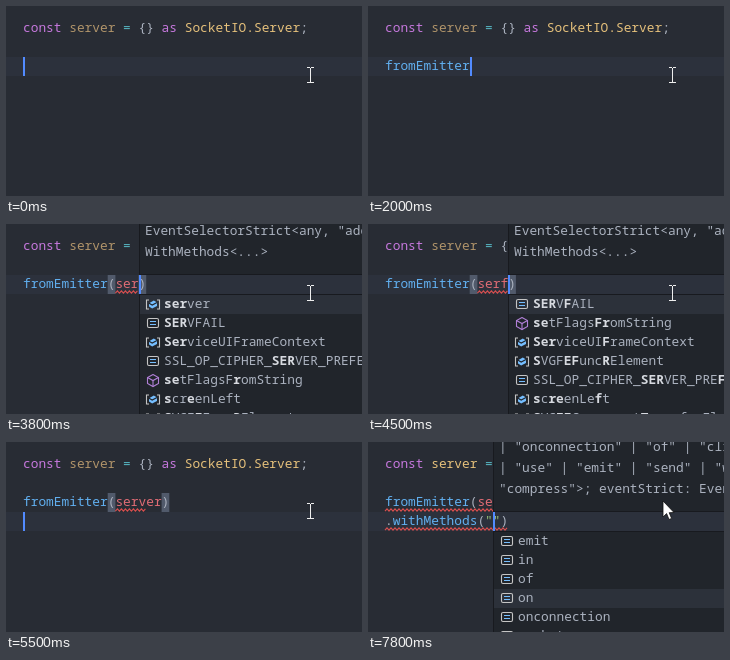
An HTML page with a canvas for the animation above (8000 ms loop, 356 by 190 pixels).

```html
<!DOCTYPE html>
<html lang="en">
<head>
<meta charset="utf-8">
<title>Typing in an editor</title>
<style>
html, body { margin: 0; width: 100%; height: 100%; overflow: hidden; background: #282c34; }
canvas { display: block; width: 356px; height: 190px; }
</style>
</head>
<body>
<canvas id="stage" width="356" height="190"></canvas>
<script>
const ctx = document.getElementById('stage').getContext('2d');
const LOOP = 8000, LEFT = 17, CHAR = 7.7, ROW = 19, TOP = 13, HINT_ROW = 21;
const FONT = '12.83px "Noto Sans Mono", "DejaVu Sans Mono", monospace';
const C = {
  bg: '#282c34', line: '#2c313c', panel: '#21252b', border: '#181a1f', text: '#abb2bf',
  bright: '#d7dae0', dim: '#7f848e', purple: '#c678dd', tan: '#b0946a', cyan: '#56b6c2',
  yellow: '#e5c07b', red: '#e06c75', blue: '#61afef', green: '#98c379',
  caret: '#528bff', error: '#d84f4f', bracket: '#515a6b', icon: '#75beff'
};
const colX = col => LEFT + col * CHAR;
const rowY = row => TOP + row * ROW;

function rect(x, y, w, h, color) {
  ctx.fillStyle = color;
  ctx.fillRect(x, y, w, h);
}

function text(str, x, base, color, bold) {
  ctx.font = (bold ? 'bold ' : '500 ') + FONT;
  ctx.fillStyle = color;
  ctx.fillText(str, x, base);
  return x + str.length * CHAR;
}

function spans(parts, x, base) {
  for (const [str, color] of parts) x = text(str, x, base, color);
}

// Text between square brackets is drawn bold.
function marked(str, x, base) {
  str.split(/[\[\]]/).forEach((part, i) => {
    x = text(part, x, base, i % 2 ? C.bright : C.text, i % 2);
  });
}

function path(points, color, fill) {
  ctx.beginPath();
  points.forEach(([x, y]) => ctx.lineTo(x, y));
  if (fill) {
    ctx.fillStyle = color;
    ctx.fill();
  } else {
    ctx.strokeStyle = color;
    ctx.stroke();
  }
}

function squiggle(from, to, row) {
  const y = rowY(row) + 17, pts = [];
  for (let x = colX(from), i = 0; x <= colX(to); x += 2, i++) pts.push([x, y + (i % 2 ? -1.2 : 1.2)]);
  ctx.lineWidth = 1.1;
  path(pts, C.error);
}

function solidCube(x, y, s) {
  path([[x - s, y - s * .3], [x + s * .2, y - s], [x + s, y - s * .5], [x + s, y + s * .4], [x - s * .2, y + s], [x - s, y + s * .5]], C.icon, true);
  path([[x - s, y - s * .3], [x - s * .2, y + s * .15], [x + s, y - s * .5]], C.panel);
}

const icons = {
  method(x, y) {
    path([[x, y - 6], [x + 5.5, y - 3], [x + 5.5, y + 3], [x, y + 6], [x - 5.5, y + 3], [x - 5.5, y - 3], [x, y - 6]], '#b180d7');
    path([[x - 5.5, y - 3], [x, y], [x + 5.5, y - 3]], '#b180d7');
    path([[x, y], [x, y + 6]], '#b180d7');
  },
  variable(x, y) {
    for (const d of [-1, 1]) {
      path([[x + d * 4, y - 4.5], [x + d * 6.5, y - 4.5], [x + d * 6.5, y + 4.5], [x + d * 4, y + 4.5]], '#c5c5c5');
    }
    solidCube(x, y, 4);
  },
  constant(x, y) {
    ctx.strokeStyle = '#c5c5c5';
    ctx.beginPath();
    ctx.roundRect(x - 5.5, y - 5, 11, 9, 1.5);
    ctx.stroke();
    rect(x - 3, y - 2.5, 6, 1, C.icon);
    rect(x - 3, y + .5, 6, 1, C.icon);
  },
  field(x, y) { solidCube(x, y, 6); }
};

const M = 'method', V = 'variable', K = 'constant';
const imports = [[M, 'from'], [V, 'fromEmitter'], [M, 'fromEvent'], [K, 'fromEvent'],
  [K, 'fromEvent'], [M, 'fromEventPattern'], [M, 'fromEventStrict']];
const serList = [[V, '[ser]ver'], [K, '[SER]VFAIL'], [V, '[Ser]viceUIFrameContext'],
  [K, 'SSL_OP_CIPHER_[SER]VER_PREFERENCE'], [M, '[se]tFlagsF[r]omString'],
  [V, '[s]cr[e]enLeft'], [V, '[S]VGF[E]Func[R]Element']];
const serfList = [[K, '[SER]V[F]AIL'], [M, '[se]tFlags[Fr]omString'], [V, '[Ser]viceUI[F]rameContext'],
  [V, '[S]VGF[EF]unc[R]Element'], [K, 'SSL_OP_CIPHER_[SER]VER_PRE[F]ERENCE'],
  [V, '[s]c[re]enLe[f]t'], [V, '[S]VG[FE]Component[T]ransferElement']];
const events = ['emit', 'in', 'of', 'on', 'onconnection', 'sockets'].map(name => [K, name]);

function importList(typed) {
  return imports.filter(([, name]) => name.startsWith(typed))
    .map(([icon, name]) => [icon, '[' + typed + ']' + name.slice(typed.length)]);
}

const hints = {
  emitter: ['fromEmitter(emitter: unknown):'],
  selector: ['EventSelectorStrict<any, "addListener"', 'WithMethods<...>'],
  methods: ['| "onconnection" | "of" | "clients"', '| "use" | "emit" | "send" | "write"', '"compress">; eventStrict: EventSelector']
};

// name: identifier before a call; arg: call argument; tail: second line of the chain
const steps = [
  { t: 0, name: '' },
  { t: 300, name: 'f' },
  { t: 800, name: 'fr', list: importList('fr'), note: 'Auto import' },
  { t: 1000, name: 'fro', list: importList('fro'), note: 'Auto import' },
  { t: 1300, name: 'from', list: importList('from'), note: 'Auto import' },
  { t: 1500, name: 'fromE', list: importList('fromE'), note: 'Auto import' },
  { t: 1800, name: 'fromEm', list: importList('fromEm'), note: 'Auto import' },
  { t: 2000, name: 'fromEmitter' },
  { t: 2300, arg: '' },
  { t: 2500, arg: '', hint: 'emitter' },
  { t: 2800, arg: '', hint: 'emitter', wavy: [0, 13] },
  { t: 3000, arg: 's', hint: 'emitter', wavy: [0, 14] },
  { t: 3300, arg: 'se', hint: 'selector', wavy: [0, 15], list: serList },
  { t: 3500, arg: 'ser', hint: 'selector', wavy: [0, 16], list: serList },
  { t: 3800, arg: 'ser', hint: 'selector', wavy: [12, 15], list: serList },
  { t: 4300, arg: 'serf', hint: 'selector', wavy: [12, 15], list: serfList },
  { t: 4500, arg: 'serf', hint: 'selector', wavy: [12, 16], list: serfList },
  { t: 4800, arg: 'ser', hint: 'selector', wavy: [12, 15], list: serList },
  { t: 5000, arg: 'serv', hint: 'selector', wavy: [12, 16], list: serList.slice(0, 4) },
  { t: 5300, arg: 'server', wavy: [12, 16] },
  { t: 5500, arg: 'server', wavy: [12, 16], tail: '' },
  { t: 5800, arg: 'server', tail: '.' },
  { t: 6000, arg: 'server', tail: '.', list: [['field', 'withMethods']] },
  { t: 6300, arg: 'server', tail: '.', list: [['field', 'withMethods']], detail: true },
  { t: 6500, arg: 'server', tail: '.', list: [['field', 'withMethods']], detail: true, wavyTail: 1, off: true },
  { t: 6800, arg: 'server', tail: '.w', list: [['field', '[w]ithMethods']], detail: true, wavyTail: 1 },
  { t: 7000, arg: 'server', tail: '.withMethods', wavyTail: 1 },
  { t: 7300, arg: 'server', tail: '.withMethods()', col: 13, hint: 'methods', wavy: [0, 19], wavyTail: 14 },
  { t: 7500, arg: 'server', tail: '.withMethods("")', col: 14, hint: 'methods', wavy: [0, 19], wavyTail: 16, list: events, pick: 3, off: true },
  { t: 7800, arg: 'server', tail: '.withMethods("")', col: 14, hint: 'methods', wavy: [0, 19], wavyTail: 16, list: events, pick: 3 }
];

function drawCode(s, row) {
  rect(0, rowY(row), 356, ROW, C.line);
  // The variable is dimmed until the editor sees that it is used.
  spans([['const ', C.purple], ['server ', s.t < 6800 ? C.tan : C.yellow], ['= ', C.cyan], ['{} ', C.text],
    ['as ', C.purple], ['SocketIO.Server', C.yellow], [';', C.text]], LEFT, rowY(0) + 13);
  const base = rowY(2) + 13;
  if (s.arg === undefined) {
    text(s.name, LEFT, base, s.name === 'fromEmitter' ? C.blue : C.red);
  } else {
    if (s.t < 5800) {
      for (const col of [11, 12 + s.arg.length]) rect(colX(col), rowY(2), CHAR, ROW, C.bracket);
    }
    spans([['fromEmitter', C.blue], ['(', C.text], [s.arg, C.red], [')', C.text]], LEFT, base);
  }
  if (s.tail) {
    const [, word, open, str, close] = s.tail.match(/^\.(\w*)(\(?)("*)(\)?)$/);
    spans([['.', C.text], [word, C.blue], [open, C.text], [str, C.green], [close, C.text]], LEFT, rowY(3) + 13);
  }
  if (s.wavy) squiggle(...s.wavy, 2);
  if (s.wavyTail) squiggle(0, s.wavyTail, 3);
}

function drawHint(s, x, bottom) {
  const lines = hints[s.hint], top = bottom - 18 - lines.length * HINT_ROW;
  rect(x, top, 400, bottom - top, C.border);
  rect(x + 1, top + 1, 400, bottom - top - 2, C.panel);
  lines.forEach((line, i) => {
    const base = bottom - 19 - (lines.length - 1 - i) * HINT_ROW;
    if (s.hint !== 'emitter') return text(line, x + 6, base, C.text);
    const start = text('fromEmitter(', x + 6, base, C.text);
    const end = text('emitter: unknown', start, base, C.text, true);
    rect(start, base + 2, end - start, 1, C.text);
    text('):', end, base, C.text);
  });
}

function drawList(s, x, top) {
  const h = s.list.length * ROW;
  rect(x, top, 331, h + 2, C.border);
  rect(x + 1, top + 1, 329, h, C.panel);
  s.list.forEach(([icon, label], i) => {
    const y = top + 1 + i * ROW;
    if (i === (s.pick || 0)) rect(x + 1, y, 329, ROW, '#2c313a');
    ctx.lineWidth = 1.1;
    icons[icon](x + 14, y + 9.5);
    marked(label, x + 25, y + 13);
  });
  if (s.note) text(s.note, 271, top + 14, C.dim);
  if (s.detail) text('(property) withMethods: <A', 148, top + 14, C.dim);
}

function drawMouse(arrow) {
  if (arrow) {
    const shape = [[295, 59], [295, 75], [298.6, 71.6], [301, 77.5], [303.6, 76.4], [301.2, 70.7], [306, 70.5], [295, 59]];
    path(shape, '#fff', true);
    ctx.lineWidth = .8;
    path(shape, '#111');
    return;
  }
  rect(304, 62, 1, 15, '#eee');
  for (const y of [61, 76]) {
    rect(301, y, 3, 1, '#eee');
    rect(305, y, 3, 1, '#eee');
  }
}

function draw(time) {
  const s = steps.filter(step => step.t <= time).pop();
  const onTail = s.tail !== undefined;
  const row = onTail ? 3 : 2;
  const col = s.col !== undefined ? s.col
    : onTail ? s.tail.length
    : s.arg === undefined ? s.name.length
    : 12 + s.arg.length + (s.t === 5300 ? 1 : 0);
  const x = Math.round(colX(col));
  rect(0, 0, 356, 190, C.bg);
  drawCode(s, row);
  if (s.hint) drawHint(s, x, rowY(row));
  if (s.list) drawList(s, x, rowY(row + 1));
  if (!s.off) rect(x, rowY(row), 2, ROW, C.caret);
  drawMouse(time >= 7300);
}

let start;
function tick(now) {
  if (start === undefined) start = now;
  draw((now - start) % LOOP);
  requestAnimationFrame(tick);
}
draw(0);
requestAnimationFrame(tick);
</script>
</body>
</html>
```
